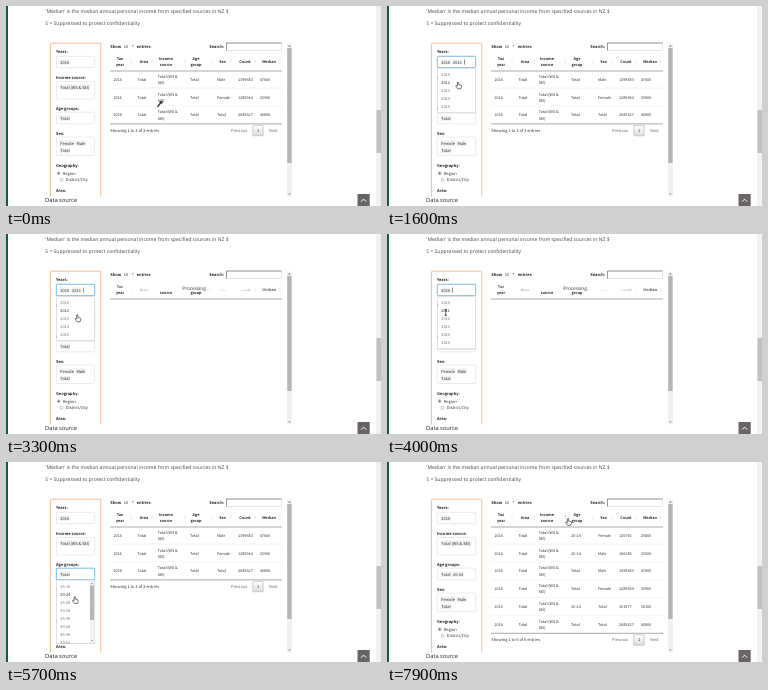
An HTML page that plays this animation: 375x200 px, repeating every 8000 ms.

```html
<!DOCTYPE html>
<html lang="en">
<head>
<meta charset="utf-8">
<title>Income table filter</title>
<style>
  html, body { margin: 0; width: 100%; height: 100%; overflow: hidden; background: #fff; }
  svg { display: block; width: 375px; height: 200px; }
  text { font: 4px "Noto Sans CJK SC", "Noto Sans CJK JP", "Noto Sans", sans-serif; fill: #333; text-rendering: geometricPrecision; }
  .page { font-family: "Open Sans", "Noto Sans", sans-serif; font-size: 5.05px; fill: #444; }
  .big { font-size: 5.75px; fill: #222; }
  .b { font-weight: 700; fill: #222; }
  .cell { font-size: 3.8px; }
  .head { font-size: 3.8px; font-weight: 700; fill: #222; }
  .mid { text-anchor: middle; }
  .busy { font-size: 4.7px; }
  .dim { fill: #666; }
  .opt { fill: #766b62; font-size: 3.9px; }
  .hot { fill: #222; }
  .box { fill: #fff; stroke: #d8d8d8; stroke-width: .5; }
  .focus { stroke: #62aadf; stroke-width: .8; }
  .tag { fill: #f1f1f1; }
</style>
</head>
<body>
<svg viewBox="0 0 375 200">
  <defs>
    <clipPath id="app"><rect x="40" y="30" width="247" height="160.5"/></clipPath>
    <clipPath id="list"><rect x="50" y="118" width="39" height="63.5"/></clipPath>
    <linearGradient id="veil">
      <stop offset="0" stop-color="#fff" stop-opacity="0"/>
      <stop offset=".25" stop-color="#fff"/>
      <stop offset=".75" stop-color="#fff"/>
      <stop offset="1" stop-color="#fff" stop-opacity="0"/>
    </linearGradient>
    <linearGradient id="btn" x2="0" y2="1">
      <stop offset="0" stop-color="#fff"/>
      <stop offset="1" stop-color="#dcdcdc"/>
    </linearGradient>
  </defs>
  <rect width="375" height="200" fill="#fff"/>
  <g id="page"></g>
  <g clip-path="url(#app)">
    <g id="table"></g>
    <rect x="44.4" y="37.2" width="50.4" height="165" rx="1" fill="#fff" stroke="#f3ab7c" stroke-width=".8"/>
    <g id="lower"></g>
    <g id="years"></g>
    <g id="ages"></g>
  </g>
  <g id="cursor"></g>
</svg>
<script>
const LOOP = 8000, STEP = 100;
const $ = id => document.getElementById(id);
const esc = s => String(s).replace(/&/g, '&amp;');

// y is the middle of the lower-case letters
const text = (x, y, s, cls = '') => `<text x="${x}" y="${y + 1.5}" class="${cls}">${esc(s)}</text>`;
const rect = (x, y, w, h, attrs) => `<rect x="${x}" y="${y}" width="${w}" height="${h}" ${attrs}/>`;
const line = (x1, y, x2, color, w = .5) =>
  `<path d="M${x1} ${y}H${x2}" stroke="${color}" stroke-width="${w}"/>`;
const tri = (x, y, r, dir, color) =>
  `<path d="M${x - r} ${y}h${2 * r}l${-r} ${dir * r * 1.2}z" fill="${color}"/>`;

const tag = (x, y, s, w) => rect(x - .8, y - 2.7, w, 5.6, 'class="tag"') + text(x, y, s);
const box = (y, h, focus) => rect(50.3, y, 38.4, h, `rx=".8" class="box ${focus ? 'focus' : ''}"`);
const caret = (x, y) => rect(x, y - 2.4, .5, 5, 'fill="#222"');
const panel = (y, h) =>
  rect(50.8, y + .6, 38.2, h, 'rx=".6" fill="#000" opacity=".18"') +
  rect(50.5, y, 38.2, h, 'rx=".6" fill="#fff" stroke="#c9c9c9" stroke-width=".5"');

function drawPage() {
  const bars =
    rect(0, 0, 2, 200, 'fill="#125c42"') +
    rect(370, 0, 5, 200, 'fill="#f1f1f1"') +
    rect(370.5, 104, 4.5, 43, 'fill="#c1c1c1"') +
    rect(281, 37.5, 5, 153, 'fill="#f1f1f1"') +
    rect(281.2, 42, 4.4, 115, 'fill="#b5b5b5"') +
    tri(283.4, 40.4, 1.1, -1, '#555') + tri(283.4, 187.4, 1.1, 1, '#555');
  const top =
    rect(351.5, 188, 12.2, 12, 'fill="#686468"') +
    '<path d="M355 195.7l2.6-2.6 2.6 2.6" fill="none" stroke="#fff" stroke-width="1"/>';
  return bars + top +
    text(39.3, 5.5, "'Median' is the median annual personal income from specified sources in NZ $", 'page') +
    text(39.3, 17, 'S = Suppressed to protect confidentiality', 'page') +
    text(39, 194.7, 'Data source', 'page big');
}

const COLS = [
  [114, 125, 'Tax', 'year'], [138, 147, 'Area'], [160, 178.5, 'Income', 'source'],
  [190, 206, 'Age', 'group'], [216.5, 225, 'Sex'], [239, 249, 'Count'], [263, 273.8, 'Median']
];
const ALL = [
  ['Total', 'Male', 1399683, 47600],
  ['Total', 'Female', 1285944, 33900]
];
const SUM = ['Total', 'Total', 2685627, 40800];
const ROWS = {
  0: [],
  3: [...ALL, SUM],
  6: [['20-24', 'Female', 135792, 25800], ['20-24', 'Male', 166185, 33500],
      ...ALL, ['20-24', 'Total', 301977, 30100], SUM]
};

function drawRow([age, sex, count, median], i) {
  const y = 73.2 + i * 17.8;
  const cells = [[107.5, 2016], [131.5, 'Total'], [184, age], [211, sex], [232, count], [253.7, median]];
  return (i ? line(104, y - 8.9, 276, '#e2e2e2', .4) : '') +
    cells.map(([x, s]) => text(x, y, s, 'cell')).join('') +
    text(151.7, y - 2.9, 'Total (WS &', 'cell') + text(151.7, y + 3.2, 'SEI)', 'cell');
}

function drawTable({ count, sorted }) {
  let s = text(104.3, 40, 'Show', 'b') + text(117.8, 40, '10') + tri(126.8, 39.5, .9, 1, '#222') +
    text(130.8, 40, 'entries', 'b') + text(203.3, 40.5, 'Search:', 'b') +
    rect(220.5, 37, 55, 7.5, 'fill="#fff" stroke="#c8c8c8" stroke-width=".5"') +
    '<path d="M220.5 44.5V37H275.5" fill="none" stroke="#666" stroke-width=".6"/>';
  COLS.forEach(([x, icon, a, b], i) => {
    s += b ? text(x, 52.3, a, 'head mid') + text(x, 58.4, b, 'head mid') : text(x, 55.3, a, 'head mid');
    const on = sorted && i === 2;
    s += tri(icon, 54.6, .9, -1, on ? '#3d65b5' : '#ccc') + tri(icon, 56, .9, 1, '#ccc');
  });
  s += line(104, 65, 276, '#555');
  if (!count) {
    return s + rect(104, 48, 172, 8.8, 'fill="url(#veil)"') + text(190, 54.6, 'Processing...', 'busy mid');
  }
  const end = 64.5 + count * 17.8, y = end + 6.5;
  return s + ROWS[count].map(drawRow).join('') + line(104, end, 276, '#555') +
    text(104.3, y, `Showing 1 to ${count} of ${count} entries`) +
    text(225, y, 'Previous', 'dim') +
    rect(246.8, y - 5, 10.4, 10.4, 'rx=".6" fill="url(#btn)" stroke="#a5a5a5" stroke-width=".5"') +
    text(252, y, '1', 'mid') + text(263, y, 'Next', 'dim');
}

const radio = (x, y, on) =>
  `<circle cx="${x}" cy="${y}" r="1.5" fill="#fff" stroke="#888" stroke-width=".5"/>` +
  (on ? `<circle cx="${x}" cy="${y}" r=".8" fill="#333"/>` : '');

function drawLower({ picked, ageOpen }) {
  return text(50, 71, 'Income source:', 'b') + box(75.5, 17.5) + tag(54.3, 81, 'Total (WS & SEI)', 31) +
    text(50, 102, 'Age groups:', 'b') + box(106.2, 11.6, ageOpen) + tag(54.3, 112, 'Total', 10.5) +
    (picked ? tag(66, 112, '20-24', 12) : '') +
    text(50, 127, 'Sex:', 'b') + box(131, 18.5) +
    tag(54.3, 137, 'Female', 14.8) + tag(70.4, 137, 'Male', 10) + tag(54.3, 144.6, 'Total', 10.5) +
    text(50, 159.3, 'Geography:', 'b') +
    radio(52.7, 167.2, true) + text(56.8, 167, 'Region') +
    radio(55.6, 173.8) + text(59.8, 173.6, 'District/City') +
    text(50, 184.3, 'Area:', 'b');
}

function drawYears({ years, open, hover }) {
  const tall = years.length > 2 ? 7.5 : 0;
  let s = text(50, 45.6, 'Years:', 'b') + box(50.3, 11.4 + tall, open);
  years.forEach((y, i) => s += tag(54.3 + i % 2 * 11.7, 56 + (i >> 1) * 7.5, y, 10));
  if (!open) return s;
  s += caret(years.length === 2 ? 77 : 65, 56 + tall);
  const left = [2010, 2011, 2012, 2013, 2014, 2015].filter(y => !years.includes(y));
  s += panel(62.6 + tall, left.length * 8.1 + 3.6);
  left.forEach((y, i) => s += text(54.3, 68 + tall + i * 8.1, y, y === hover ? 'opt hot' : 'opt'));
  return s;
}

function drawAges({ ageOpen, ageHover }) {
  if (!ageOpen) return '';
  let s = panel(118.3, 63.2) + '<g clip-path="url(#list)">';
  for (let i = 0; i < 8; i++) {
    const from = 15 + i * 5;
    s += text(54.3, 124 + i * 8.1, `${from}-${from + 4}`, i === ageHover ? 'opt hot' : 'opt');
  }
  return s + rect(83.7, 118.6, 4.6, 62.6, 'fill="#f1f1f1"') + rect(84, 123.5, 4, 34.5, 'fill="#b8b8b8"') +
    tri(86, 121.8, .9, -1, '#555') + tri(86, 178, .9, 1, '#555') + '</g>';
}

const CURSORS = {
  pen: '<path d="M3 -3.5L2.2 .2 1 -.6 -2 3.4 -3.2 2.4 -.2 -1.4 -1.2 -2.4z" fill="#222" stroke="#fff" stroke-width=".3"/>',
  arrow: '<path d="M0 0V5.2L1.2 4.1 2 6 2.9 5.6 2.1 3.8H3.8z" fill="#fff" stroke="#222" stroke-width=".5"/>',
  ibeam: '<path d="M-1.3 -2.8H1.3M-1.3 2.8H1.3M0 -2.8V2.8" stroke="#222" stroke-width=".7" fill="none"/>',
  hand: '<path d="M-.6 .3Q0 -.5 .6 .3V2.8L3 3.3Q3.6 3.5 3.5 4.3L2.9 7H-.4L-2.2 4.4Q-2.3 3.4 -1.4 3.7L-.6 4.4z" fill="#fff" stroke="#222" stroke-width=".6"/>'
};

// [time, x, y, shape]
const PATH = [
  [0, 154, 98, 'pen'], [100, 154, 98, 'arrow'], [600, 76.5, 55, 'ibeam'], [1000, 76.5, 55, 'ibeam'],
  [1300, 71, 75, 'hand'], [1500, 71, 75, 'hand'], [2000, 71, 82, 'hand'], [2500, 71.3, 80.7, 'hand'],
  [3600, 71.3, 80.7, 'hand'], [4000, 58.7, 78.5, 'ibeam'], [4500, 58.7, 78.5, 'arrow'],
  [5300, 69, 111, 'ibeam'], [5600, 68.7, 134.5, 'hand'], [5900, 68.7, 134.5, 'hand'],
  [6100, 66, 134, 'arrow'], [6500, 26.5, 127.3, 'arrow'], [6700, 26.5, 127.3, 'arrow'],
  [7300, 181, 56.3, 'hand'], [8000, 181, 56.3, 'hand']
];
const YEARS = [[0, [2016]], [1500, [2016, 2011]], [2200, [2016, 2011, 2013]], [2900, [2016, 2011]], [3600, [2016]]];
const HOVER = [[0, 2010], [1300, 2011], [1600, 2012], [2000, 2013], [2200, 2012], [3800, 2011]];
const COUNT = [[0, 3], [1700, 0], [4500, 3], [6100, 0], [6400, 6]];

const at = (table, t) => table.filter(k => k[0] <= t).pop()[1];
const within = (t, a, b) => t >= a && t < b;

function pointer(t) {
  const i = PATH.findIndex(k => k[0] > t) - 1;
  const [t0, x0, y0, shape] = PATH[i], [t1, x1, y1] = PATH[i + 1];
  const u = (t - t0) / (t1 - t0), e = u * u * (3 - 2 * u);
  return { shape, x: x0 + (x1 - x0) * e, y: y0 + (y1 - y0) * e };
}

const last = {};
function paint(id, draw, state) {
  const key = JSON.stringify(state);
  if (last[id] === key) return;
  last[id] = key;
  $(id).innerHTML = draw(state);
}

function show(t) {
  const years = at(YEARS, t), ageOpen = within(t, 5400, 6000);
  paint('table', drawTable, { count: at(COUNT, t), sorted: t >= 7600 });
  paint('lower', drawLower, { picked: t >= 6000, ageOpen });
  paint('years', drawYears, { years, open: within(t, 600, 4500), hover: at(HOVER, t) });
  paint('ages', drawAges, { ageOpen, ageHover: t >= 5500 ? 1 : 0 });
  $('lower').setAttribute('transform', `translate(0 ${years.length > 2 ? 7.5 : 0})`);
  const p = pointer(t);
  paint('cursor', s => CURSORS[s], p.shape);
  $('cursor').setAttribute('transform', `translate(${p.x} ${p.y})`);
}

$('page').innerHTML = drawPage();
const start = performance.now();
function tick() {
  const t = (performance.now() - start) % LOOP;
  show(Math.floor(t / STEP) * STEP);
  requestAnimationFrame(tick);
}
tick();
</script>
</body>
</html>
```
